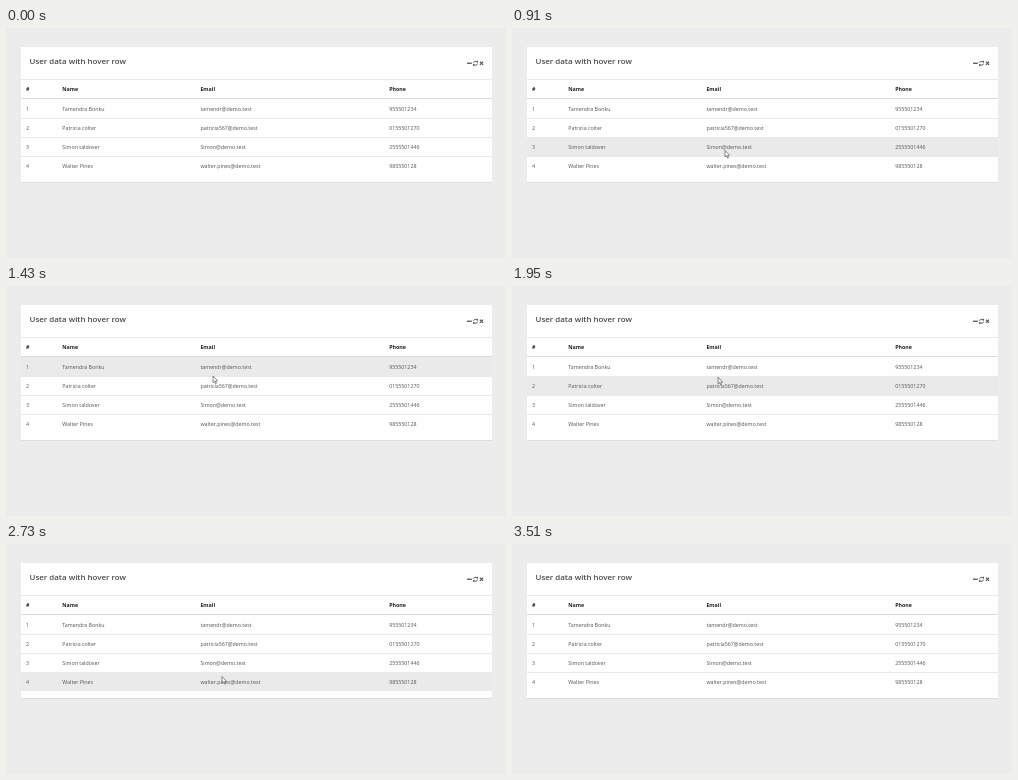
An HTML page with a canvas that plays this animation: 500x230 px, repeating every 4.29 s.

```html
<!DOCTYPE html>
<html lang="en">
<head>
<meta charset="utf-8">
<title>User data with hover row</title>
<style>
  html, body { margin: 0; width: 100%; height: 100%; overflow: hidden; background: #ececec; }
  canvas { display: block; width: 500px; height: 230px; }
</style>
</head>
<body>
<canvas id="stage"></canvas>
<script>
const W = 500, H = 230, TICK = 130, TICKS = 33;
const canvas = document.getElementById('stage');
const ctx = canvas.getContext('2d');
const ratio = window.devicePixelRatio || 1;
canvas.width = W * ratio;
canvas.height = H * ratio;
ctx.scale(ratio, ratio);

const FONT = '"Open Sans", "Noto Sans", sans-serif';
const CARD = { x: 15, y: 19, w: 471, h: 135 };
const ROW_TOP = 71, ROW_H = 19.1;
const COLUMNS = [
  { x: 20, head: '#', cells: ['1', '2', '3', '4'] },
  { x: 56.3, head: 'Name', cells: ['Tamendra Bonku', 'Patricia colter', 'Simon taldover', 'Walter Pines'] },
  { x: 194.4, head: 'Email', cells: ['tamendr@demo.test', 'patricia567@demo.test', 'Simon@demo.test', 'walter.pines@demo.test'] },
  { x: 383.2, head: 'Phone', cells: ['955501234', '0155501270', '2555501446', '985550128'] }
];

// Where the pointer turns or rests, in ticks
const STOPS = [
  { at: 1, x: 222, y: 168 },
  { at: 4, x: 215, y: 136 },
  { at: 6, x: 215, y: 136 },
  { at: 7, x: 213, y: 122.5 },
  { at: 11, x: 207, y: 90 },
  { at: 13, x: 204.5, y: 83.5 },
  { at: 14, x: 204.5, y: 83.5 },
  { at: 20, x: 214, y: 130 },
  { at: 21, x: 216, y: 132.5 },
  { at: 25, x: 228, y: 246 }
];
const ARROW = new Path2D('M0 0V6.6L1.5 5.3L2.5 7.7L3.5 7.2L2.5 5L4.6 4.8Z');

const lerp = (a, b, k) => a + (b - a) * k;

function pointerAt(tick) {
  const next = STOPS.findIndex(s => s.at > tick);
  if (next < 1) return null;
  const a = STOPS[next - 1], b = STOPS[next];
  const k = (tick - a.at) / (b.at - a.at);
  return { x: lerp(a.x, b.x, k), y: lerp(a.y, b.y, k) };
}

function box(x, y, w, h, color) {
  ctx.fillStyle = color;
  ctx.fillRect(x, y, w, h);
}

function band(y, h, color) {
  box(CARD.x, y, CARD.w, h, color);
}

function text(str, x, y, size, weight, color) {
  ctx.font = `${weight} ${size}px ${FONT}`;
  ctx.fillStyle = color;
  ctx.fillText(str, x, y);
}

function drawIcons() {
  const y = 35.3, r = 1.6;
  box(461, y - 0.7, 4.8, 1.3, '#555');
  ctx.strokeStyle = '#555';
  ctx.lineWidth = 0.9;
  for (const side of [1, -1]) {
    const start = side > 0 ? 0.2 : Math.PI + 0.2;
    ctx.beginPath();
    ctx.arc(469.5, y, 2, start, start + 2.4);
    ctx.stroke();
    box(468.8 + side * 1.8, y - 0.8 - side * 1.7, 1.4, 1.7, '#555');
  }
  ctx.lineWidth = 1.2;
  ctx.beginPath();
  for (const side of [1, -1]) {
    ctx.moveTo(475.5 - r, y - side * r);
    ctx.lineTo(475.5 + r, y + side * r);
  }
  ctx.stroke();
}

function drawPointer({ x, y }) {
  ctx.save();
  ctx.translate(x, y);
  ctx.fillStyle = '#fff';
  ctx.fill(ARROW);
  ctx.strokeStyle = '#555';
  ctx.lineWidth = 0.7;
  ctx.stroke(ARROW);
  ctx.restore();
}

function draw(tick) {
  box(0, 0, W, H, '#ececec');
  band(CARD.y, CARD.h, '#fefefe');
  band(CARD.y + CARD.h, 1, '#dedede');
  text('User data with hover row', 23.5, 36.1, 7.95, 600, '#4a4a4a');
  drawIcons();
  band(51, 1, '#e9e9e9');
  band(70, 1, '#dcdcdc');

  const tip = pointerAt(tick);
  const hover = tip ? Math.floor((tip.y - ROW_TOP) / ROW_H) : -1;
  for (let i = 0; i < 4; i++) {
    const top = Math.floor(ROW_TOP + i * ROW_H);
    if (i === hover) band(top, 19, '#eaeaea');
    if (i > 0) band(top, 1, '#e9e9e9');
  }
  for (const { x, head, cells } of COLUMNS) {
    text(head, x, 63, 5.3, 700, '#222');
    cells.forEach((cell, i) => text(cell, x, 82.7 + i * ROW_H, 5.3, 400, '#555'));
  }
  if (tip) drawPointer(tip);
}

const begin = performance.now();
function frame() {
  draw(Math.floor((performance.now() - begin) / TICK) % TICKS);
  requestAnimationFrame(frame);
}
frame();
</script>
</body>
</html>
```
